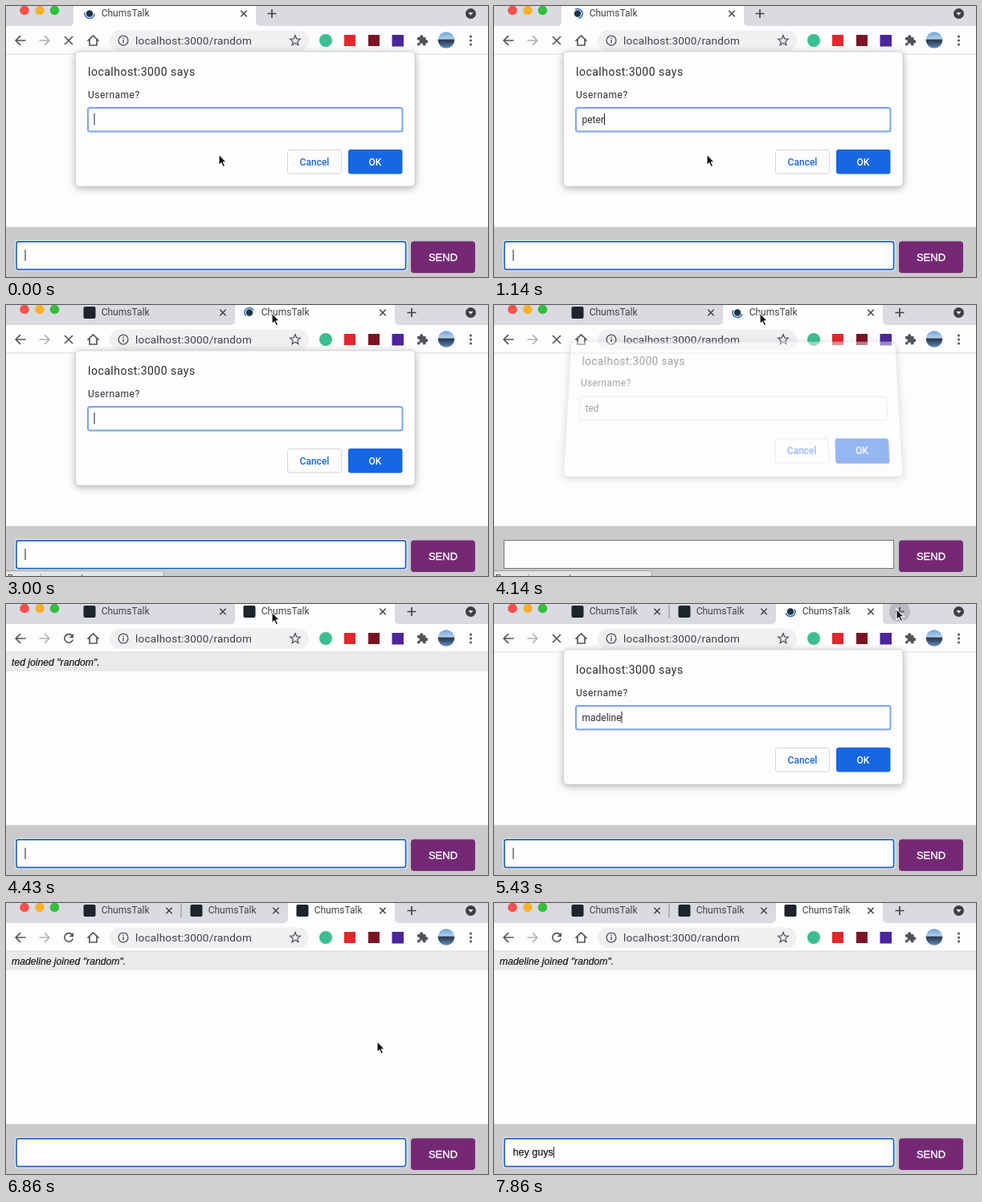
An HTML page for the animation above (8000 ms loop, 600 px wide and 338 px high).

```html
<!DOCTYPE html>
<html lang="en">
<head>
<meta charset="utf-8">
<title>Chat room demo</title>
<style>
  html, body { margin: 0; width: 100%; height: 100%; overflow: hidden; background: #fdfcfe; }
  #stage { position: fixed; inset: 0; overflow: hidden; contain: strict; }
  svg { position: absolute; left: 0; top: 0; width: 600px; height: 338px; overflow: hidden; }
  text { white-space: pre; }
  .ui { font-family: Roboto, "Open Sans", sans-serif; font-size: 12px; fill: #3f4246; }
  .page { font-family: "Liberation Sans", Arial, sans-serif; fill: #111; stroke: #111; stroke-width: .15; }
  .line { fill: none; stroke: #54575b; stroke-width: 1.7; }
  /* Only as large as the panel and its shadow, so that tilting stays inside the stage. */
  #dialog { left: 70px; top: 45px; width: 455px; height: 200px; transform-origin: 227.5px 180px; }
  #panel { filter: drop-shadow(0 2px 5px rgba(0, 0, 0, .32)); }
</style>
</head>
<body>
<div id="stage">
<svg viewBox="0 0 600 338">
  <defs>
    <linearGradient id="photo" x1="0" y1="0" x2="0" y2="1">
      <stop offset="0" stop-color="#6ea5de"/>
      <stop offset=".42" stop-color="#b3cde6"/>
      <stop offset=".5" stop-color="#2b3b4f"/>
      <stop offset=".66" stop-color="#35506f"/>
      <stop offset="1" stop-color="#6690bd"/>
    </linearGradient>
  </defs>

  <!-- page -->
  <rect width="600" height="338" fill="#fdfcfe"/>
  <g id="notice">
    <rect y="60" width="600" height="24" fill="#eae9eb"/>
    <text id="joined" class="page" x="7" y="76.5" font-size="12.2" font-style="italic"></text>
  </g>
  <rect y="275.6" width="600" height="63" fill="#cac9cb"/>
  <rect id="halo" x="11" y="292" width="488.5" height="38.5" rx="4" fill="#f1f3f8"/>
  <rect id="field" fill="#fdfcfe"/>
  <text id="message" class="page" x="23.5" y="315" font-size="12.6"></text>
  <rect id="caret" y="304" width="1" height="14" fill="#222"/>
  <rect x="504" y="293.5" width="80" height="39.5" rx="4" fill="#752975"/>
  <text class="page" x="544" y="318" font-size="13" text-anchor="middle"
    style="fill:#fff;stroke:#fff;stroke-width:.35">SEND</text>
  <g id="status">
    <rect x="-5" y="331.5" width="201.5" height="12" rx="3" fill="#e4e3e5" stroke="#a3a3a5"/>
    <text class="ui" x="2" y="343.5" style="font-size:11px">Processing request...</text>
  </g>

  <!-- window frame -->
  <rect width="600" height="25" fill="#dadbe1"/>
  <g id="tabs"></g>
  <rect y="25" width="600" height="35" fill="#fdfcfe"/>
  <rect y="59.5" width="600" height="1" fill="#dddcdf"/>
  <circle cx="23" cy="5.5" r="5.8" fill="#f9504b"/>
  <circle cx="42" cy="5.5" r="5.8" fill="#f8b02c"/>
  <circle cx="60.5" cy="5.5" r="5.8" fill="#35bd42"/>
  <circle cx="578.5" cy="9.5" r="6.5" fill="#3d3f43"/>
  <path d="M575.3 8h6.4l-3.2 3.8z" fill="#e8e8ea"/>

  <!-- toolbar -->
  <path class="line" d="M24.5 43H12.5M18 37.2L12.2 43L18 48.8"/>
  <path class="line" style="stroke:#b3b4b7" d="M41.5 43H53.5M48 37.2L53.8 43L48 48.8"/>
  <path id="stop" class="line" d="M73 38L83 48M83 38L73 48"/>
  <g id="reload">
    <path class="line" d="M82.2 39.5A5.3 5.3 0 1 0 83.2 44.5"/>
    <path d="M84 36.8V42.3H78.5z" fill="#54575b"/>
  </g>
  <path class="line" d="M101.5 43.6L108.5 37L115.5 43.6M104 42V49H113V42"/>
  <rect x="129" y="30.5" width="248" height="25.5" rx="12.7" fill="#f0f0f3"/>
  <circle class="line" style="stroke-width:1.4" cx="146" cy="43" r="5.9"/>
  <path class="line" style="stroke-width:1.4" d="M146 42V46.3M146 39.4V40.9"/>
  <text class="ui" x="161" y="47.5" style="font-size:13.6px;letter-spacing:.16px">localhost:3000/random</text>
  <path id="star" class="line" style="stroke-width:1.3"/>
  <circle cx="398" cy="43" r="8" fill="#3dbd93"/>
  <rect x="421" y="36" width="14" height="14" fill="#e0282d"/>
  <rect x="451" y="36" width="14" height="14" fill="#7b1422"/>
  <rect x="480.5" y="36" width="14.5" height="14.5" fill="#4b259b"/>
  <path d="M512 39H515.2A2.1 2.1 0 1 1 519.2 39H522.5V42.2A2.1 2.1 0 1 1 522.5 46.2V49.3H519A2 2 0 1 0 515.3 49.3H512V46A2 2 0 1 0 512 42.4z" fill="#515458"/>
  <circle cx="548" cy="42.5" r="10.3" fill="url(#photo)"/>
  <g fill="#515458">
    <circle cx="578.5" cy="38" r="1.5"/><circle cx="578.5" cy="43" r="1.5"/><circle cx="578.5" cy="48" r="1.5"/>
  </g>
</svg>

<svg id="dialog" viewBox="70 45 455 200">
  <rect id="panel" x="86.5" y="57" width="422.5" height="168" rx="5" fill="#fdfcff" stroke="#c6c6cb" stroke-width=".6"/>
  <text class="ui" x="102" y="87" style="font-size:14px;letter-spacing:.5px;fill:#2b2d31">localhost:3000 says</text>
  <text class="ui" x="102" y="114.5" style="letter-spacing:.5px;fill:#2b2d31">Username?</text>
  <rect id="entry" x="102" y="127" width="391.5" height="29.5" rx="2.5" fill="#fdfcff"/>
  <text id="typed" class="ui" x="109.5" y="145.8" style="fill:#2b2d31"></text>
  <rect id="mark" y="134" width="1" height="14.5" fill="#222"/>
  <rect x="350.5" y="179.5" width="67" height="29.5" rx="3" fill="#fdfcff" stroke="#d3d5da"/>
  <text class="ui" x="384" y="198.5" text-anchor="middle" style="font-weight:500;fill:#1b67dc">Cancel</text>
  <rect x="426" y="179" width="67.5" height="30.5" rx="3" fill="#1766e4"/>
  <text class="ui" x="459.5" y="198.5" text-anchor="middle" style="font-weight:500;fill:#fff">OK</text>
</svg>

<svg viewBox="0 0 600 338">
  <path id="cursor" d="M0 0V13.5L3.1 10.8L5.2 15.8L7.6 14.8L5.5 9.9H9.5z" fill="#111" stroke="#fff" stroke-width="1.1"/>
</svg>
</div>

<script>
const LOOP = 8000, STEP = 1000 / 7, TITLE = "ChumsTalk";

// All times below are counted in steps.
const visits = [
  { at: 0,  name: "peter",    type: 2,  rate: 1, close: 9,  join: 11, open: 0 },
  { at: 20, name: "ted",      type: 24, rate: 1, close: 29, join: 31, open: 20 },
  { at: 34, name: "madeline", type: 36, rate: 3, close: 40, join: 42, open: 35 }
];
const layouts = [
  { icons: [104], close: [296], active: [84, 311], plus: 331 },
  { icons: [104, 303], close: [270, 469], active: [285, 484], plus: 505 },
  { icons: [104, 237, 369], close: [203, 336, 469], active: [351, 484], plus: 505, split: 218 }
];
const moves = [
  [0, 265, 185], [16, 265, 185], [17, 305, 80], [18, 331, 10], [31, 331, 10],
  [33, 501, 6], [44, 501, 6], [47, 462, 172.5], [56, 462, 172.5]
];
const MESSAGE = "hey guys", WRITE = 50;

const $ = id => document.getElementById(id);
const show = (id, on) => { $(id).style.display = on ? "" : "none"; };
const set = (id, attrs) => { for (const k in attrs) $(id).setAttribute(k, attrs[k]); };
const clip = (n, max) => Math.max(0, Math.min(max, n));

function starPath(cx, cy, r) {
  let d = "";
  for (let k = 0; k < 10; k++) {
    const a = k * Math.PI / 5 - Math.PI / 2, q = k % 2 ? r * .45 : r;
    d += (k ? "L" : "M") + (cx + q * Math.cos(a)).toFixed(2) + " " + (cy + q * Math.sin(a)).toFixed(2);
  }
  return d + "z";
}

function favicon(x, loading, i) {
  if (!loading) return `<rect x="${x - 7.5}" y="2" width="15" height="15" rx="2" fill="#1d242c"/>`;
  return `<circle cx="${x}" cy="9.5" r="4.2" fill="#1f3441"/>
    <circle cx="${x}" cy="9.5" r="6" fill="none" stroke="#2e70c4" stroke-width="1.6"
      stroke-dasharray="20 18" transform="rotate(${i * 75} ${x} 9.5)"/>`;
}

function tabStrip(n, loading, hover, i) {
  const { icons, close, active: [a, b], plus, split } = layouts[n];
  let out = `<path d="M${a - 6} 25q6 0 6 -6V-5H${b}V19q0 6 6 6z" fill="#fdfcfe"/>`;
  if (split) out += `<rect x="${split - .5}" y="1" width="1" height="17" fill="#85868a"/>`;
  icons.forEach((x, k) => {
    const c = close[k];
    out += favicon(x, loading && k === n, i) +
      `<text class="ui" x="${x + 14.7}" y="13.4">${TITLE}</text>
       <path class="line" style="stroke:#404347;stroke-width:1.5" d="M${c - 3.7} 5.8l7.4 7.4m0 -7.4l-7.4 7.4"/>`;
  });
  if (hover) out += `<circle cx="${plus}" cy="9.5" r="13" fill="#b8b9be"/>`;
  return out + `<path class="line" style="stroke:#404347" d="M${plus - 5.5} 9.5h11m-5.5 -5.5v11"/>`;
}

function pointer(i) {
  const k = Math.max(1, moves.findIndex(m => m[0] >= i));
  const [t0, x0, y0] = moves[k - 1], [t1, x1, y1] = moves[k];
  const p = (i - t0) / (t1 - t0);
  return [x0 + (x1 - x0) * p, y0 + (y1 - y0) * p];
}

// Width of the drawn text, so that the caret follows it.
const endOf = (id, x) => x + ($(id).textContent ? $(id).getComputedTextLength() : 0);

let last = -1;
function draw(i) {
  const n = visits.filter(v => v.at <= i).length - 1, v = visits[n];
  const loading = i < v.join, closing = i === v.close;
  const focused = i < v.close || !loading;
  const [x, y] = pointer(i);

  const hover = Math.hypot(x + 2 - layouts[n].plus, y - 8) < 13;
  $("tabs").innerHTML = tabStrip(n, loading, hover, i);
  show("stop", loading);
  show("reload", !loading);
  show("status", n === 1 && i < v.close + 2);

  show("notice", !loading);
  $("joined").textContent = `${v.name} joined "random".`;

  show("halo", focused);
  set("field", focused
    ? { x: 12.9, y: 293.9, width: 484.7, height: 34.7, rx: 2.5, stroke: "#1c62c0", "stroke-width": 1.7 }
    : { x: 12.5, y: 293.5, width: 485, height: 35, rx: 0, stroke: "#77777a", "stroke-width": 1 });
  const text = n === 2 ? MESSAGE.slice(0, clip(Math.ceil((i - WRITE + 1) * 4 / 3), 8)) : "";
  $("message").textContent = text;
  set("caret", { x: endOf("message", 23.5) });
  const blink = (i - v.join) * STEP % 1000 < 500;
  show("caret", focused && (loading || text || blink));

  show("dialog", i >= v.open && i <= v.close);
  $("dialog").style.opacity = closing ? .46 : 1;
  $("dialog").style.transform = closing
    ? "translateY(-11px) perspective(660px) rotateX(10deg) scaleY(1.064)" : "none";
  $("typed").textContent = v.name.slice(0, clip((i - v.type + 1) * v.rate, v.name.length));
  set("entry", closing ? { stroke: "#d6d6da", "stroke-width": 1 } : { stroke: "#79a5ea", "stroke-width": 2 });
  if (!closing) set("mark", { x: endOf("typed", 109.5) });
  show("mark", !closing);

  set("cursor", { transform: `translate(${x} ${y})` });
  show("cursor", i < WRITE);
}

function tick(now) {
  const i = Math.floor((now % LOOP + 4) / STEP) % 56;
  if (i !== last) draw(last = i);
  requestAnimationFrame(tick);
}

set("star", { d: starPath(360, 43.2, 6.6) });
draw(0);
requestAnimationFrame(tick);
</script>
</body>
</html>
```
